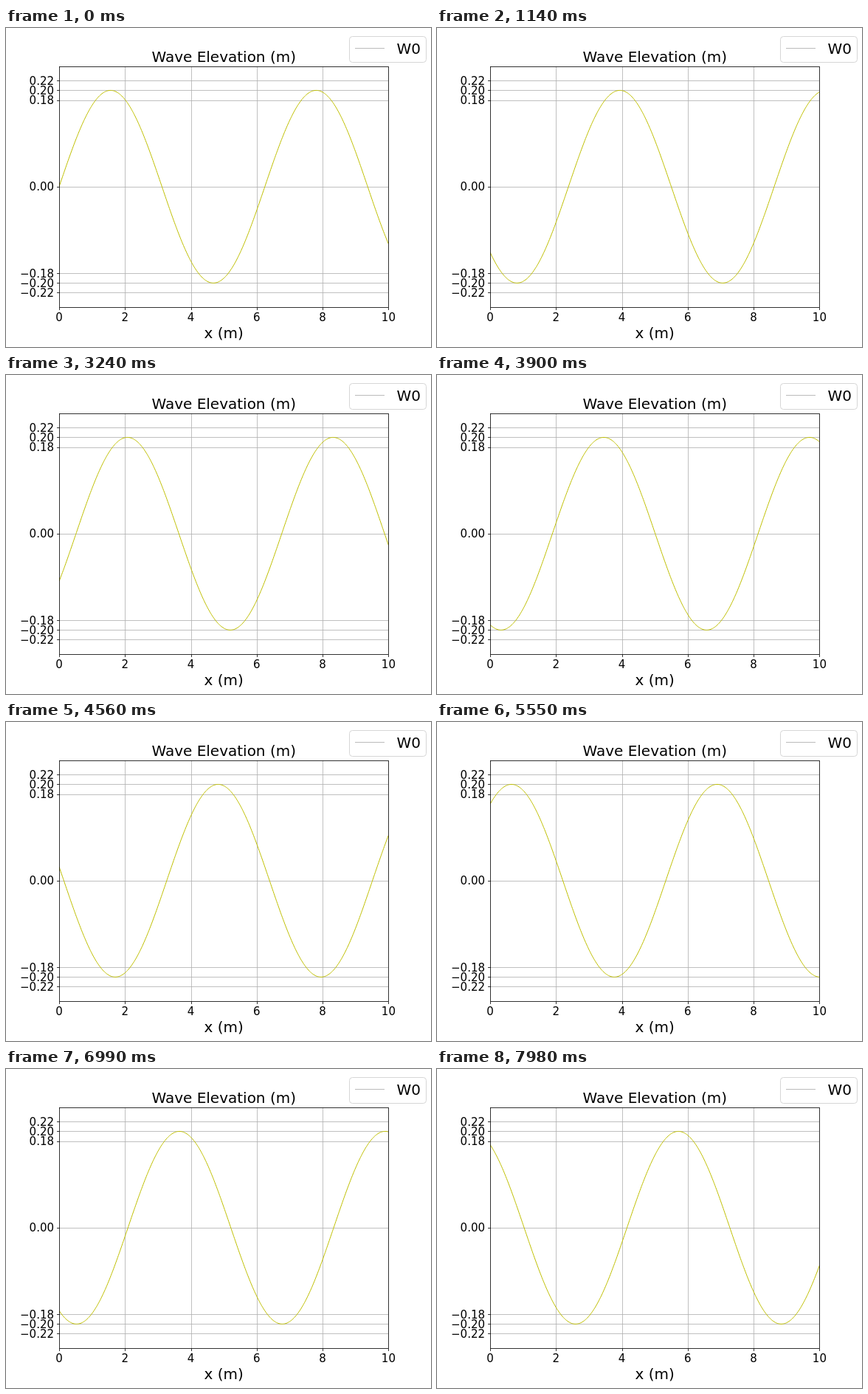
An HTML page that plays this animation: 576x432 px, repeating every 8000 ms.

```html
<!DOCTYPE html>
<html lang="en">
<head>
<meta charset="utf-8">
<title>Wave Elevation</title>
<style>
  html, body { margin: 0; width: 100%; height: 100%; overflow: hidden; background: #fff; }
  svg { display: block; }
  text { font: 20px "DejaVu Sans", sans-serif; text-anchor: middle; }
  .tick { font-size: 15px; }
  .end { text-anchor: end; }
  path, rect { fill: none; stroke: #000; stroke-width: .8; }
  .grid { stroke: #b0b0b0; }
  .legend { stroke: #ccc; }
  .key { stroke: #aaa; }
  #wave { stroke: #bfbf00; stroke-width: 1; stroke-linejoin: round; }
</style>
</head>
<body>
<svg width="576" height="432" viewBox="0 0 576 432">
  <clipPath id="plot"><rect x="72" y="52" width="446.4" height="326"/></clipPath>
  <g id="axes"></g>
  <path id="wave" clip-path="url(#plot)"/>
  <rect x="72.5" y="52.5" width="446" height="326"/>
  <text x="295.2" y="46">Wave Elevation (m)</text>
  <text x="295.2" y="420">x (m)</text>
  <rect class="legend" x="465.5" y="11.5" width="104" height="35" rx="4"/>
  <path class="key" d="M473 27.5h40"/>
  <text x="545.7" y="34.5">W0</text>
</svg>
<script>
const LEFT = 72, RIGHT = 518.4, TOP = 51.84, BOTTOM = 378;
const LOOP = 8000, STEP = 30;
const AMPLITUDE = 0.2, OMEGA = Math.PI, K = OMEGA ** 2 / 9.81;
const TIME_STEP = 10 / 499;

const toX = x => LEFT + x / 10 * (RIGHT - LEFT);
const toY = y => (TOP + BOTTOM) / 2 - y * (BOTTOM - TOP) / 0.5;
const snap = v => Math.floor(v + 0.501) + 0.5;

let axes = '';
for (const x of [0, 2, 4, 6, 8, 10]) {
  const px = snap(toX(x));
  if (x % 10) axes += `<path class="grid" d="M${px} 52V378"/>`;
  axes += `<path d="M${px} 378.5v3.5"/><text class="tick" x="${toX(x)}" y="397">${x}</text>`;
}
for (const y of [0.22, 0.2, 0.18, 0, -0.18, -0.2, -0.22]) {
  const py = snap(toY(y)), label = y.toFixed(2).replace('-', '\u2212');
  axes += `<path class="grid" d="M72 ${py}H518"/><path d="M72.5 ${py}h-3.5"/>
    <text class="tick end" x="65" y="${Math.round(toY(y) + 5.5)}">${label}</text>`;
}
document.getElementById('axes').innerHTML = axes;

const wave = document.getElementById('wave');
function draw(now) {
  const t = Math.floor(now % LOOP / STEP) * TIME_STEP;
  const points = [];
  for (let i = 0; i <= 400; i++) {
    const x = i / 40;
    const y = AMPLITUDE * Math.sin(K * x - OMEGA * t);
    points.push(`${toX(x).toFixed(2)} ${toY(y).toFixed(2)}`);
  }
  wave.setAttribute('d', 'M' + points.join('L'));
}

const start = performance.now();
function tick() {
  draw(performance.now() - start);
  requestAnimationFrame(tick);
}
tick();
</script>
</body>
</html>
```
